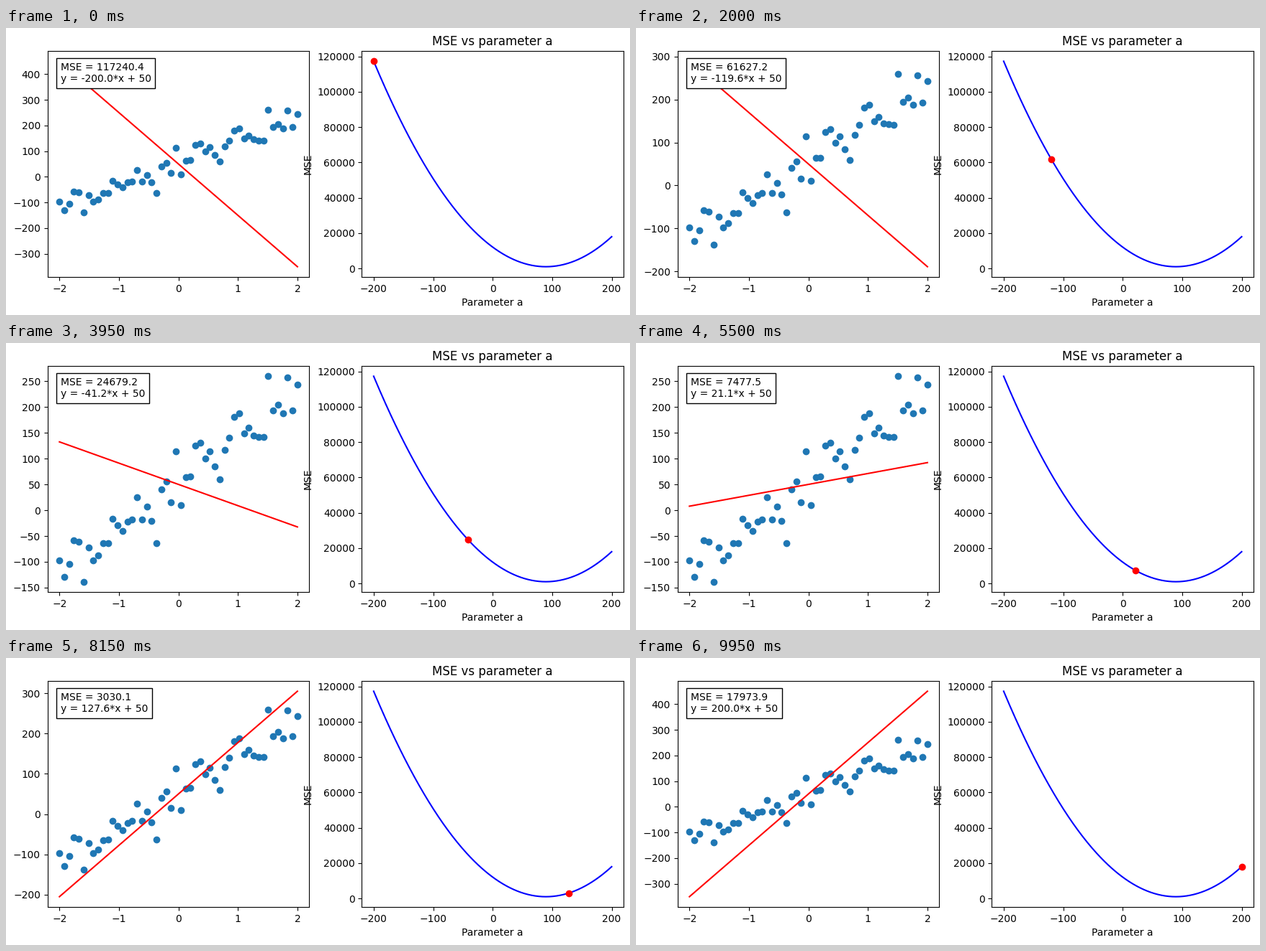
Write a matplotlib script that moves like this. It is 867 px wide and 400 px high and loops after 10 s.

```python
import numpy as np
import matplotlib.pyplot as plt
from matplotlib.animation import FuncAnimation

W, H, DPI = 867, 400, 100
FRAMES, INTERVAL = 200, 50
INTERCEPT = 50
AXES_W, TOP, BOTTOM = 363.75, 32, 347

# Noisy line y = 100x + 50
np.random.seed(0)
x = np.linspace(-2, 2, 50)
y = 100 * x + INTERCEPT + 30 * np.random.randn(50)

slopes = np.linspace(-200, 200, FRAMES)
errors = np.array([np.mean((y - a * x - INTERCEPT) ** 2) for a in slopes])

fig = plt.figure(figsize=(W / DPI, H / DPI), dpi=DPI, facecolor="white")


def add_axes(left):
    """Add a panel whose left edge is given in pixels."""
    return fig.add_axes([left / W, 1 - BOTTOM / H, AXES_W / W, (BOTTOM - TOP) / H])


fit_ax = add_axes(57.7)
fit_ax.scatter(x, y)
fit_line, = fit_ax.plot(x, x, "r")
label = fit_ax.text(0.05, 0.95, "", transform=fit_ax.transAxes, va="top",
                    bbox=dict(facecolor="white", edgecolor="black"))

mse_ax = add_axes(494.3)
mse_ax.plot(slopes, errors, "b")
dot = mse_ax.scatter(slopes[:1], errors[:1], color="red", zorder=3)
mse_ax.set_title("MSE vs parameter a")
mse_ax.set_xlabel("Parameter a")
mse_ax.set_ylabel("MSE")


def update(i):
    a, mse = slopes[i], errors[i]
    fit = a * x + INTERCEPT
    fit_line.set_ydata(fit)

    # The view follows the points and the line with a 5% margin
    low, high = min(y.min(), fit.min()), max(y.max(), fit.max())
    margin = 0.05 * (high - low)
    fit_ax.set_ylim(low - margin, high + margin)

    label.set_text(f"MSE = {mse:.1f}\ny = {a:.1f}*x + {INTERCEPT}")
    dot.set_offsets([[a, mse]])
    return fit_line, label, dot


anim = FuncAnimation(fig, update, frames=FRAMES, interval=INTERVAL,
                     init_func=lambda: update(0), repeat=True, repeat_delay=0)
plt.show()
```
